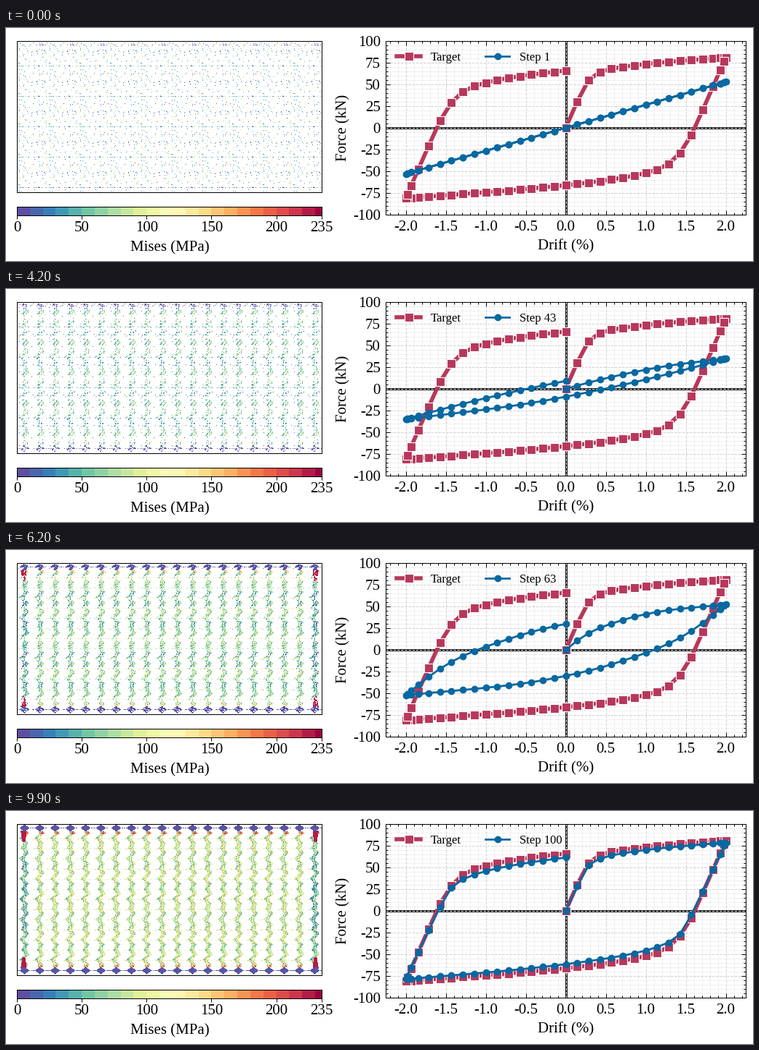
Animation of 1027 by 322 pixels, one loop 10000 ms. Source, as a matplotlib script:

```python
import numpy as np
import matplotlib.pyplot as plt
from matplotlib.animation import FuncAnimation
from matplotlib.colors import BoundaryNorm
from matplotlib.ticker import MultipleLocator

W, H, DPI = 1027, 322, 100
FRAMES, INTERVAL = 100, 100
RED, BLUE = "#b7385c", "#0868a1"

plt.rcParams.update({
    "font.family": "Liberation Serif",
    "font.size": 15,
    "axes.unicode_minus": False,
    "axes.linewidth": 0.72,
})


def smooth(x, xs, ys):
    """Shape-preserving cubic through the points (xs, ys)."""
    xs, ys = np.asarray(xs, float), np.asarray(ys, float)
    h = np.diff(xs)
    s = np.diff(ys) / h
    both = s[:-1] * s[1:]
    total = np.where(both > 0, s[:-1] + s[1:], 1)
    mid = np.where(both > 0, 2 * both / total, 0)
    m = np.concatenate([s[:1], mid, s[-1:]])
    i = np.clip(np.searchsorted(xs, x, side="right") - 1, 0, len(h) - 1)
    t = np.clip((x - xs[i]) / h[i], 0, 1)
    return ((2*t**3 - 3*t**2 + 1) * ys[i] + (t**3 - 2*t**2 + t) * h[i] * m[i]
            + (3*t**2 - 2*t**3) * ys[i + 1] + (t**3 - t**2) * h[i] * m[i + 1])


# ---- hysteresis loop -------------------------------------------------
KEYS = [0, 13, 29, 42, 55, 70, 88]
K = np.array([0, 1/7, 1.5/7, 2/7, 2.5/7, 3/7, 4/7, 6/7, 9/7, 2])
TARGET = [0, 30, 44.5, 55, 61.3, 64.5, 68, 72, 76, 81]
CURVES = np.array([
    26.5 * K,
    23.1 * K - 1.55 * K**2,
    13.1 * K - 0.1 * K**2,
    26.5 * K - 4.5 * K**2,
    [0, 5.6, 8.2, 10.8, 13.2, 15.6, 20, 28, 36.3, 43.5],
    [0, 18, 26, 32.3, 36.6, 39.8, 44.3, 51, 57, 63],
    [0, 28, 41.5, 52.8, 57.5, 60.2, 63.8, 68.3, 73, 78.7],
])

up = np.concatenate([np.arange(13) / 7, [1.84, 1.93, 1.98, 2.0]])
down = np.concatenate([up[::-1][1:], -up[1:]])
back = -up[::-1][1:]
DRIFT = np.concatenate([up, down, back])


def loop_force(backbone):
    """Masing rule: unloading branches are the backbone scaled by two."""
    def f(x):
        return smooth(x, K, backbone)
    peak = backbone[-1]
    return np.concatenate([f(up),
                           peak - 2 * f((2 - down) / 2),
                           2 * f((2 + back) / 2) - peak])


def backbone_at(n):
    return [float(smooth(n, KEYS, col)) for col in CURVES.T]


# ---- stress field ----------------------------------------------------
NX, NY = 419, 209
rng = np.random.default_rng(12)
Y, X = np.mgrid[0:NY, 0:NX]
col = X // 21
u = X % 21 - 10.0


def tiled_noise(w, h, clump):
    """Uniform noise on one cell, repeated over the whole panel."""
    a = rng.random((h, w))
    if clump:
        a = a + 0.6 * (np.roll(a, 1, 0) + np.roll(a, 1, 1))
    rank = a.ravel().argsort().argsort().reshape(h, w) / a.size
    return np.tile(rank, (NY // h + 1, NX // w + 1))[:NY, :NX]


def bump(shift):
    return np.clip(1 - np.abs((Y + shift) % 14 - 7) / 5, 0, 1)


speck = tiled_noise(42, 42, False)
grain = tiled_noise(21, 42, True)
tint = tiled_noise(42, 42, False)
shade = tiled_noise(21, 42, True)

offset = u - 1.2 * np.sin(2 * np.pi * Y / 28)
half = np.where(offset < 0, 1.7 + 4.2 * bump(2), 1.7 + 4.2 * bump(9))
reach = np.abs(offset) / (half + 1.6 * (shade - 0.5))
edge = np.minimum(np.abs(Y - 5), np.abs(Y - 202))
plate = (Y < 10) | (Y > 197)
diamond = np.abs(u) / 6.0 + edge / 5.0
gap = np.minimum(Y, NY - 1 - Y)
outer = (col == 0) | (col == 19)
side = np.where(col == 0, u, -u)

SCATTER = [.045, .036, .016, .01, .005, 0, 0]
FILL = [0, .07, .18, .3, .5, .9, 1]
REACH = [1.7, 1.5, 1.25, 1.1, 1, 1, 1]


def stress(n):
    scatter, fill, span = (float(smooth(n, KEYS, r))
                           for r in (SCATTER, FILL, REACH))
    late = np.clip((n - 45) / 25, 0, 1)
    final = np.clip((n - 70) / 18, 0, 1)

    solid = speck < scatter
    value = 10 + 130 * tint**1.5

    spine = (reach < span) & (grain < fill) & ~plate
    core = np.where(np.abs(offset) < 1, 25, 0) * late
    tone = 35 + 65 * shade + core + 18 * final - 22 * np.clip(reach, 0, 1)
    tone = tone + 70 * (tint > 0.86)
    tone = tone - np.where(outer, 35 * late * np.clip(gap / 60, 0, 1), 0)
    value = np.where(spine, tone, value)
    solid = solid | spine

    # thin struts between the columns
    strut = (Y % 14 == 6) & ~plate & (speck < 0.45 * late) & ~spine
    value = np.where(strut, 80 + 85 * tint, value)
    solid = solid | strut
    knot = (Y % 42 == 34) & (speck < 0.3) & ~spine
    value = np.where(knot, 5 + 75 * tint + 55 * late, value)
    solid = solid | knot

    # high stress next to the end plates
    hot = (gap > 8) & (gap < 14) & spine & (shade > 0.45)
    value = np.where(hot, value + 95 * late, value)
    corner = outer & (gap > 8) & (gap < 25) & (side < 3)
    corner &= np.abs(side + 1) < 4.5 - (gap - 9) * 0.17
    corner &= (grain < fill) & (late > 0)
    value = np.where(corner, 228, value)
    solid = solid | corner

    # end plates: diamonds joined by a thin line
    gem = plate & (diamond < 1.08) & (grain < fill * 1.15)
    line = (edge == 0) & (speck < 0.22 + 0.35 * late)
    solid = solid | gem | line
    value = np.where(plate & (gem | line | (n > 25)), 4 + 8 * tint, value)
    return np.ma.masked_where(~solid, np.clip(value, 1, 234))


# ---- figure ----------------------------------------------------------
fig = plt.figure(figsize=(W / DPI, H / DPI), dpi=DPI, facecolor="white")


def panel(x0, y0, x1, y1):
    return fig.add_axes([x0 / W, 1 - y1 / H, (x1 - x0) / W, (y1 - y0) / H])


def label(x, y, text, **kw):
    fig.text(x / W, 1 - y / H, text, ha="center", **kw)


cmap = plt.get_cmap("Spectral_r", 24)
norm = BoundaryNorm(np.arange(0, 241, 10), 24)

field = panel(15, 18, 434, 227)
image = field.imshow(stress(0), cmap=cmap, norm=norm, aspect="auto",
                     interpolation="nearest")
field.set(xticks=[], yticks=[])

bar = panel(15, 247, 434, 259)
bar.imshow(np.arange(0.5, 235)[None, :], cmap=cmap, norm=norm, aspect="auto",
           extent=(0, 235, 0, 1), interpolation="nearest")
bar.set(yticks=[], xticks=[0, 50, 100, 150, 200, 235])
bar.tick_params(length=3.5, width=0.7, pad=2.5)
label(225, 308, "Mises (MPa)", va="baseline")

ax = panel(522, 18, 1017, 258)
ax.set(xlim=(-2.25, 2.25), ylim=(-100, 100))
ax.xaxis.set_major_locator(MultipleLocator(0.5))
ax.xaxis.set_minor_locator(MultipleLocator(0.1))
ax.yaxis.set_major_locator(MultipleLocator(25))
ax.yaxis.set_minor_locator(MultipleLocator(5))
ax.tick_params(which="both", direction="in", top=True, right=True, width=0.7)
ax.tick_params(which="major", length=4, pad=5)
ax.tick_params(which="minor", length=2)
ax.tick_params(axis="x", pad=5.4)
ax.set_axisbelow(True)
ax.grid(which="major", color="#d0d0d0", ls="--", lw=0.7)
ax.grid(which="minor", color="#d0d0d0", ls=":", lw=0.6)
for draw in (ax.axhline, ax.axvline):
    draw(0, color="black", lw=2.1, zorder=1)
    draw(0, color="white", lw=0.7, ls="--", zorder=1.1)
label(769.5, 306, "Drift (%)", va="baseline")
label(463.5, 138, "Force (kN)", va="center", rotation=90)

ax.plot(DRIFT, loop_force(TARGET), color=RED, lw=4, marker="s", ms=8.5,
        mec="white", mew=0.8, label="Target", zorder=3)
curve, = ax.plot(DRIFT, loop_force(backbone_at(0)), color=BLUE, lw=2,
                 marker="o", ms=6, label="Step 1", zorder=4)
legend = ax.legend(loc="upper left", ncol=2, fontsize=12, frameon=False)
step_text = legend.get_texts()[1]


def update(i):
    n = min(i, KEYS[-1])
    image.set_data(stress(n))
    curve.set_ydata(loop_force(backbone_at(n)))
    step_text.set_text(f"Step {i + 1}")
    return image, curve, step_text


anim = FuncAnimation(fig, update, frames=FRAMES, interval=INTERVAL,
                     repeat=True, repeat_delay=0, blit=False)
plt.show()
```
